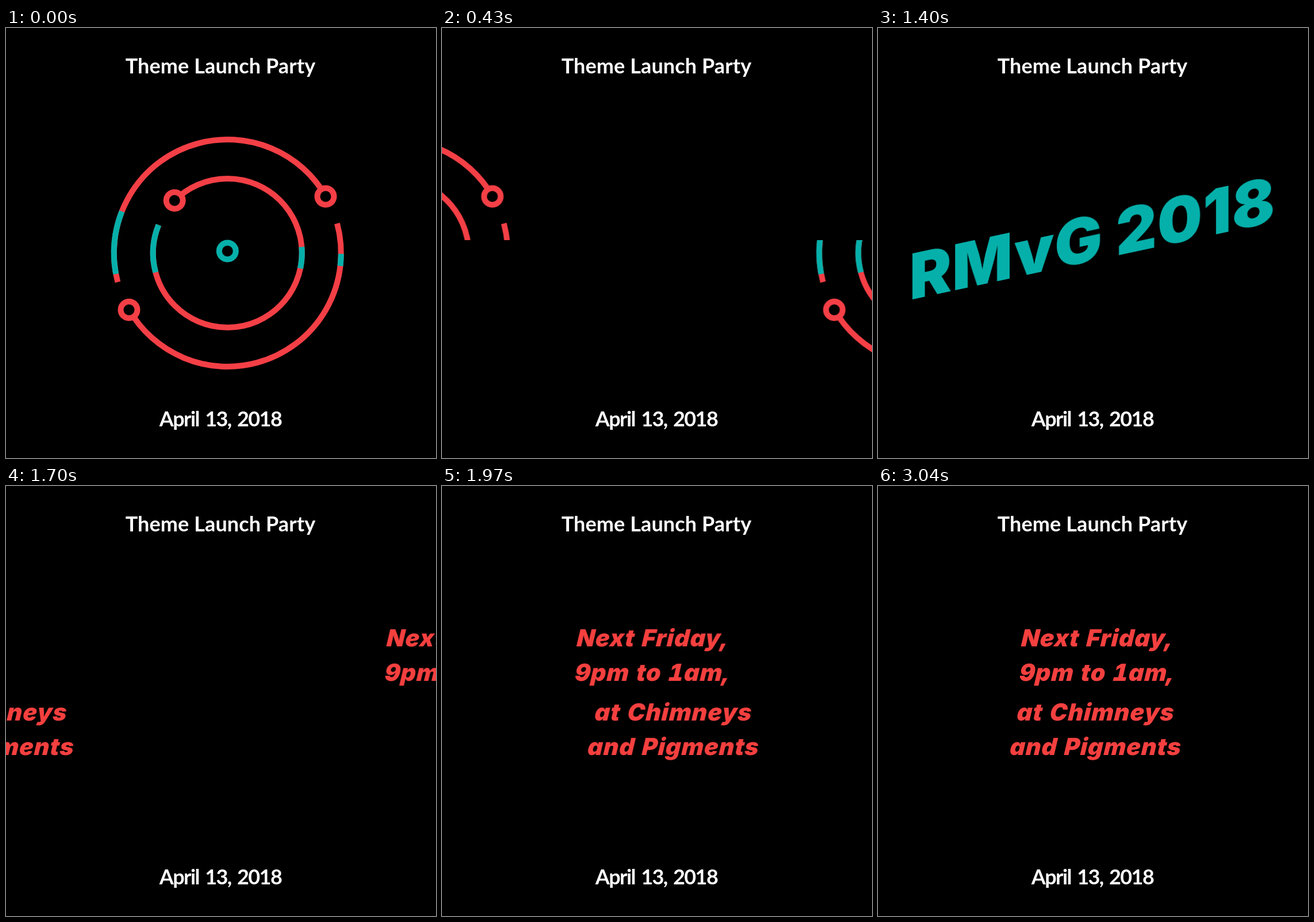
These frames come from a looping animation (748 by 748 pixels, 3.08 s). An HTML page:

```html
<!DOCTYPE html>
<html lang="en">
<head>
<meta charset="utf-8">
<title>Theme Launch Party</title>
<style>
html, body { margin: 0; width: 100%; height: 100%; overflow: hidden; background: #000; }
svg { display: block; width: 100vw; height: 100vh; }

.caption { font: 700 36px Lato, "Open Sans", sans-serif; fill: #fff; text-anchor: middle; letter-spacing: .1px; }
.date { letter-spacing: -1.55px; word-spacing: 3px; }
.headline { font: 900 110px Inter, "Liberation Sans", sans-serif; fill: #06b0aa; text-anchor: middle; letter-spacing: .9px; }
.info { font: italic 900 41px Inter, "Liberation Sans", sans-serif; fill: #f4403f; text-anchor: middle;
  letter-spacing: 1px; font-variant-numeric: tabular-nums; }
.info text { transform-box: fill-box; transform-origin: center; transform: skewX(-4deg); }

.ring { fill: none; stroke: #f43f46; stroke-width: 10; }
.node { fill: #000; stroke: #f43f46; stroke-width: 10; }
.teal { stroke: #06b0aa; }

/* The halves slide in opposite directions: --dir is the entry side, --over the overshoot. */
.top { --dir: 1px; --over: 15; }
.bottom { --dir: -1px; --over: 24; }
.slide { animation: 3080ms infinite both; }
.emblem { animation-name: emblem; }
.name { animation-name: name; }
.place { animation-name: place; }

@keyframes emblem {
  0% { transform: none; animation-timing-function: ease-in-out; }
  5.52% { transform: translateX(calc(var(--dir) * 15)); animation-timing-function: cubic-bezier(.5, 0, .75, 0); }
  14.87%, 100% { transform: translateX(calc(var(--dir) * -705)); }
}
@keyframes name {
  0%, 19.48% { transform: translateX(calc(var(--dir) * 705)); animation-timing-function: cubic-bezier(.25, 1, .5, 1); }
  28.57% { transform: translateX(calc(var(--dir) * var(--over) * -1)); animation-timing-function: ease-in-out; }
  36.69%, 45.94% { transform: translateX(0); animation-timing-function: cubic-bezier(.32, 0, .67, 0); }
  51.95%, 100% { transform: translateX(calc(var(--dir) * -705)); }
}
@keyframes place {
  0%, 54.12% { transform: translateX(calc(var(--dir) * 705)); animation-timing-function: cubic-bezier(.25, 1, .5, 1); }
  63.31% { transform: translateX(calc(var(--dir) * var(--over) * -1)); animation-timing-function: ease-in-out; }
  72.73%, 100% { transform: translateX(0); }
}
</style>
</head>
<body>
<svg viewBox="0 0 748 748">
  <defs>
    <clipPath id="upper"><rect width="748" height="369"/></clipPath>
    <clipPath id="lower"><rect y="369" width="748" height="379"/></clipPath>

    <!-- Dash lengths are in degrees, each arc is rotated to its start angle. -->
    <g id="emblem" transform="translate(385.3 391.5)">
      <g class="ring">
        <circle r="197.5" pathLength="360" stroke-dasharray="164.8 360" transform="rotate(165.2)"/>
        <circle r="197.5" pathLength="360" stroke-dasharray="165.1 360" transform="rotate(-15.1)"/>
        <circle r="129.5" pathLength="360" stroke-dasharray="337.5 360" transform="rotate(-135.3)"/>
        <g class="teal">
          <circle r="197.5" pathLength="360" stroke-dasharray="32.1 360" transform="rotate(169.4)"/>
          <circle r="197.5" pathLength="360" stroke-dasharray="6.1 360" transform="rotate(.4)"/>
          <circle r="129.5" pathLength="360" stroke-dasharray="16.6 360" transform="rotate(-4.7)"/>
          <circle r="129.5" pathLength="360" stroke-dasharray="37.2 360" transform="rotate(165)"/>
        </g>
      </g>
      <circle class="node" cx="170.7" cy="-98.5" r="14.5"/>
      <circle class="node" cx="-171.3" cy="98.8" r="14.5"/>
      <circle class="node" cx="-92.1" cy="-91.5" r="14.5"/>
      <circle class="node teal" cy="-3.5" r="14.5"/>
    </g>

    <text id="name" class="headline" transform="translate(373 405) skewY(-12.1)">RMvG 2018</text>

    <g id="place" class="info">
      <text x="381" y="279">Next Friday,</text>
      <text x="381" y="339">9pm to 1am,</text>
      <text x="379" y="408">at Chimneys</text>
      <text x="379" y="468">and Pigments</text>
    </g>
  </defs>

  <rect width="748" height="748"/>

  <g class="top" clip-path="url(#upper)">
    <use class="slide emblem" href="#emblem"/>
    <use class="slide name" href="#name"/>
    <use class="slide place" href="#place"/>
  </g>
  <g class="bottom" clip-path="url(#lower)">
    <use class="slide emblem" href="#emblem"/>
    <use class="slide name" href="#name"/>
    <use class="slide place" href="#place"/>
  </g>

  <text class="caption" x="373" y="79">Theme Launch Party</text>
  <text class="caption date" x="373" y="692.5">April 13, 2018</text>
</svg>
</body>
</html>
```
